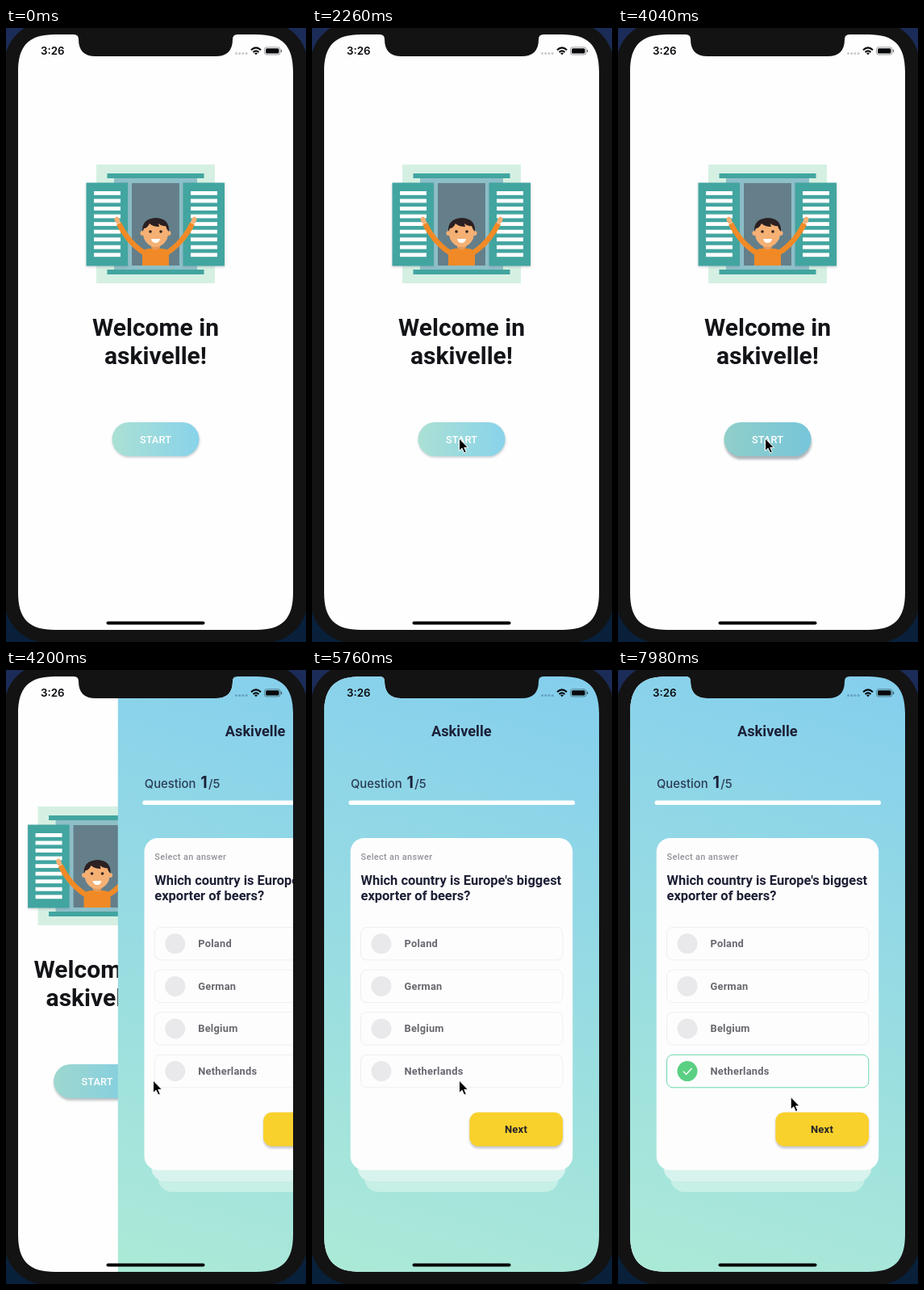
These frames come from a looping animation (372x760 px, 8000 ms). An HTML page:

```html
<!DOCTYPE html>
<html lang="en">
<head>
<meta charset="utf-8">
<title>Quiz app</title>
<style>
  html, body { margin: 0; width: 100%; height: 100%; overflow: hidden; background: #131314; }
  svg { display: block; width: 372px; height: 760px; font-family: Roboto, sans-serif; }
  .mid { text-anchor: middle; }
  .bold { font-weight: 700; }
</style>
</head>
<body>
<svg viewBox="0 0 372 760">
  <defs>
    <clipPath id="screen">
      <path d="M61 8H84q6 0 6 6q0 21 21 21H260q21 0 21-21q0-6 6-6H310c32.500 0 46 13.500 46 46V699c0 32.500-13.500 46-46 46H61c-32.500 0-46-13.500-46-46V54c0-32.500 13.500-46 46-46z"/>
    </clipPath>
    <linearGradient id="desk" x2="0" y2="1">
      <stop stop-color="#1b2c58"/><stop offset="1" stop-color="#08203a"/>
    </linearGradient>
    <linearGradient id="sky" gradientUnits="userSpaceOnUse" x1="300" y1="8" x2="70" y2="745">
      <stop stop-color="#85cfed"/><stop offset="1" stop-color="#abe9d7"/>
    </linearGradient>
    <linearGradient id="pill">
      <stop stop-color="#abe0d4"/><stop offset="1" stop-color="#88d3ea"/>
    </linearGradient>
    <filter id="soft" x="-20%" y="-40%" width="140%" height="200%"><feGaussianBlur stdDeviation="1.5"/></filter>
  </defs>

  <rect width="372" height="760" fill="url(#desk)"/>
  <rect x="-2" y="-8" width="376" height="769" rx="53" fill="#131314"/>

  <g clip-path="url(#screen)">
    <g id="welcome">
      <rect x="15" y="8" width="341" height="737" fill="#fefefe"/>
      <rect x="112" y="169" width="147" height="147" fill="#d5f0e2"/>
      <g fill="#8dbfc8">
        <rect x="134" y="186" width="103" height="6"/>
        <rect x="134" y="293" width="103" height="6"/>
        <rect x="150" y="192" width="71" height="102"/>
      </g>
      <g fill="#42a5a0">
        <rect x="125.500" y="180" width="120" height="6"/>
        <rect x="125.500" y="299" width="120" height="6"/>
      </g>
      <rect x="156" y="192" width="59" height="102" fill="#647f8a"/>
      <g id="shutters"></g>

      <path d="M140 242Q152 267 174 280M231 242Q219 267 197 280" fill="none" stroke="#f18a26" stroke-width="6.500"/>
      <path d="M169 294V281q0-8 9-8h15q9 0 9 8V294z" fill="#f18a26"/>
      <g fill="#f5b074">
        <ellipse cx="138" cy="238" rx="3" ry="4.500" transform="rotate(-25 138 238)"/>
        <ellipse cx="233" cy="238" rx="3" ry="4.500" transform="rotate(25 233 238)"/>
        <path d="M180 266h11v6q-5.500 5-11 0z" fill="#e5995a"/>
        <circle cx="169.500" cy="254" r="3"/>
        <circle cx="201.500" cy="254" r="3"/>
        <ellipse cx="185.500" cy="254" rx="15.500" ry="17"/>
      </g>
      <path d="M169 252Q168 236 186 235Q203 236 202 252Q199 249 198 245Q193 246 189 242L190 246Q182 246 178 242Q175 248 171 248z" fill="#2b2022"/>
      <g fill="#33241f"><circle cx="179" cy="252" r="1.800"/><circle cx="192" cy="252" r="1.800"/></g>
      <path d="M180 261h11q-1 5-5.500 5t-5.500-5z" fill="#fff"/>

      <g class="mid bold" font-size="30" fill="#131418">
        <text x="185.500" y="381">Welcome in</text>
        <text x="185.500" y="416">askivelle!</text>
      </g>

      <rect id="glow" x="132" width="108" height="42" rx="21" fill="#8c949c" filter="url(#soft)"/>
      <rect x="131.500" y="488" width="108" height="42" rx="21" fill="url(#pill)"/>
      <rect id="press" x="131.500" y="488" width="108" height="42" rx="21" fill="#52a6b4"/>
      <text class="mid" x="185.500" y="514" font-size="12.730" font-weight="500" letter-spacing=".1" fill="#fff">START</text>
    </g>

    <g id="quiz">
      <rect x="15" y="8" width="341" height="737" fill="url(#sky)"/>
      <text class="mid" x="185.300" y="82" font-size="18.200" font-weight="600" fill="#1c2038">Askivelle</text>
      <g fill="#2a3c54" font-family="Inter, sans-serif" font-size="14.800" font-weight="500">
        <text x="48" y="146">Question</text>
        <text x="117.500" y="146" class="bold" font-size="19.500" fill="#1c2038">1</text>
        <text x="127.300" y="146">/5</text>
      </g>
      <rect x="45.500" y="161.500" width="280.500" height="5.500" rx="2.500" fill="#fefefe"/>
      <rect x="65" y="590" width="241" height="56" rx="17" fill="#c6efe6"/>
      <rect x="56.500" y="580" width="258" height="53" rx="17" fill="#d8f3ee"/>
      <rect x="47.700" y="208" width="275.500" height="411" rx="17" fill="#fdfdfe"/>
      <text x="60.500" y="235" font-size="10.900" font-weight="500" letter-spacing=".36" fill="#92929a">Select an answer</text>
      <g class="bold" font-size="16.480" fill="#1d1f35">
        <text x="60.500" y="265.500">Which country is Europe's biggest</text>
        <text x="60.500" y="284.500">exporter of beers?</text>
      </g>
      <g id="options"></g>
      <rect x="195.500" y="549" width="115.500" height="43" rx="11" fill="#8f93a0" opacity=".55" filter="url(#soft)"/>
      <rect x="195.300" y="547.500" width="115.700" height="42" rx="11" fill="#f9d12c"/>
      <text class="mid bold" x="253" y="573" font-size="13" letter-spacing=".2" fill="#24232a">Next</text>
    </g>

    <text x="43" y="33" font-family="Inter, sans-serif" font-weight="600" font-size="13.300" fill="#08090c">3:26</text>
    <g id="signal">
      <circle cx="285.500" cy="31.500" r="1.500"/><circle cx="289.700" cy="31.500" r="1.500"/>
      <circle cx="293.900" cy="31.500" r="1.500"/><circle cx="298.100" cy="31.500" r="1.500"/>
    </g>
    <g fill="none" stroke="#08090c" stroke-width="2">
      <path d="M304 27.200Q310 21.500 316 27.200M306.500 30Q310 26.800 313.500 30"/>
      <path d="M308 31.200Q310 29.700 312 31.200L310 33.300z" fill="#08090c" stroke="none"/>
      <rect x="320.500" y="23.800" width="19.500" height="9.200" rx="2.800" stroke-width=".8" stroke-opacity=".5"/>
      <rect x="322" y="25.300" width="16.500" height="6.200" rx="1.500" fill="#08090c" stroke="none"/>
      <path d="M341.500 26.800v3.200" stroke-width="1.200" stroke-opacity=".6"/>
    </g>
    <rect x="124.500" y="734.500" width="122" height="4" rx="2" fill="#050506"/>
  </g>

  <path id="cursor" d="M0 0V15.500L3.600 12.200L6.200 18L8.800 16.900L6.300 11.300H11z" fill="#000" stroke="#fff" stroke-width="1" stroke-linejoin="round"/>
</svg>

<script>
const LOOP = 8000;
const el = id => document.getElementById(id);
const clamp = v => Math.min(1, Math.max(0, v));
const span = (t, from, to) => clamp((t - from) / (to - from));
const linear = p => p;
const easeIn = p => p * p;
const easeOut = p => 1 - (1 - p) ** 2;

// Cubic Bezier easing, solved for x by bisection
function bezier(x, x1, y1, x2, y2) {
  const curve = (u, a, b) => 3 * u * (1 - u) ** 2 * a + 3 * u * u * (1 - u) * b + u ** 3;
  let low = 0, high = 1;
  for (let i = 0; i < 24; i++) {
    const mid = (low + high) / 2;
    if (curve(mid, x1, x2) < x) low = mid; else high = mid;
  }
  return curve(high, y1, y2);
}

el('shutters').innerHTML = [99.5, 219.5].map(x => {
  const slats = Array.from({ length: 9 }, (_, i) =>
    `<rect x="${x + 9.5}" y="${202 + i * 9.55}" width="33" height="4.8" fill="#fefefe"/>`).join('');
  return `<rect x="${x}" y="193" width="52" height="103" fill="#8f93a0" opacity=".4" filter="url(#soft)"/>
    <rect x="${x}" y="191.5" width="51.500" height="103" fill="#42a5a0"/>${slats}`;
}).join('');

const idle = { box: '#efeff4', dot: '#e9e9eb' };
const picked = { box: '#6cd8a8', dot: '#5bd083' };

el('options').innerHTML = ['Poland', 'German', 'Belgium', 'Netherlands'].map((label, i) =>
  `<g transform="translate(0 ${i * 52.6})">
    <rect class="box" x="60.500" y="318.500" width="250.300" height="40.500" rx="7.500" fill="none" stroke="${idle.box}"/>
    <circle class="dot" cx="86" cy="338.800" r="12.500" fill="${idle.dot}"/>
    <text class="bold" x="114.500" y="343.300" font-size="12.850" letter-spacing=".23" fill="#68686f">${label}</text>
  </g>`).join('');

const answer = el('options').lastElementChild;
answer.insertAdjacentHTML('beforeend',
  '<path id="tick" d="M81 339l3.600 3.600l7-7.400" fill="none" stroke="#fff" stroke-width="1.400"/>');
const answerBox = answer.querySelector('.box');
const answerDot = answer.querySelector('.dot');

// Pointer stops: time, x, y, easing of the way there
const pointerPath = [
  [440, 384, 640], [860, 270.5, 556.5, linear], [1900, 182.5, 508, easeOut],
  [7450, 182.5, 508, linear], [LOOP, 216.5, 530, easeIn]
];

function pointerAt(t) {
  const i = Math.max(1, pointerPath.findIndex(stop => stop[0] > t));
  const [t0, x0, y0] = pointerPath[i - 1], [t1, x1, y1, ease] = pointerPath[i];
  const p = ease(span(t, t0, t1));
  return [x0 + (x1 - x0) * p, y0 + (y1 - y0) * p];
}

function draw(t) {
  const slide = bezier(span(t, 4050, 4640), .35, .91, .33, .97);
  el('welcome').setAttribute('transform', `translate(${-113.7 * slide} 0)`);
  el('quiz').setAttribute('transform', `translate(${341 * (1 - slide)} 0)`);
  el('signal').setAttribute('fill', slide > .5 ? '#649fc6' : '#c9c9ce');

  const pressed = easeOut(span(t, 3620, 3920)) * (1 - span(t, 4050, 4350));
  el('press').setAttribute('opacity', .3 * pressed);
  el('glow').setAttribute('y', 489.5 + 2.5 * pressed);
  el('glow').setAttribute('opacity', .5 + .2 * pressed);

  const chosen = t >= 6750;
  const look = chosen ? picked : idle;
  answerBox.setAttribute('stroke', look.box);
  answerDot.setAttribute('fill', look.dot);
  el('tick').setAttribute('opacity', chosen ? 1 : 0);

  el('cursor').setAttribute('transform', `translate(${pointerAt(t)})`);
}

const start = performance.now();
function frame() {
  draw((performance.now() - start) % LOOP);
  requestAnimationFrame(frame);
}
frame();
</script>
</body>
</html>
```
